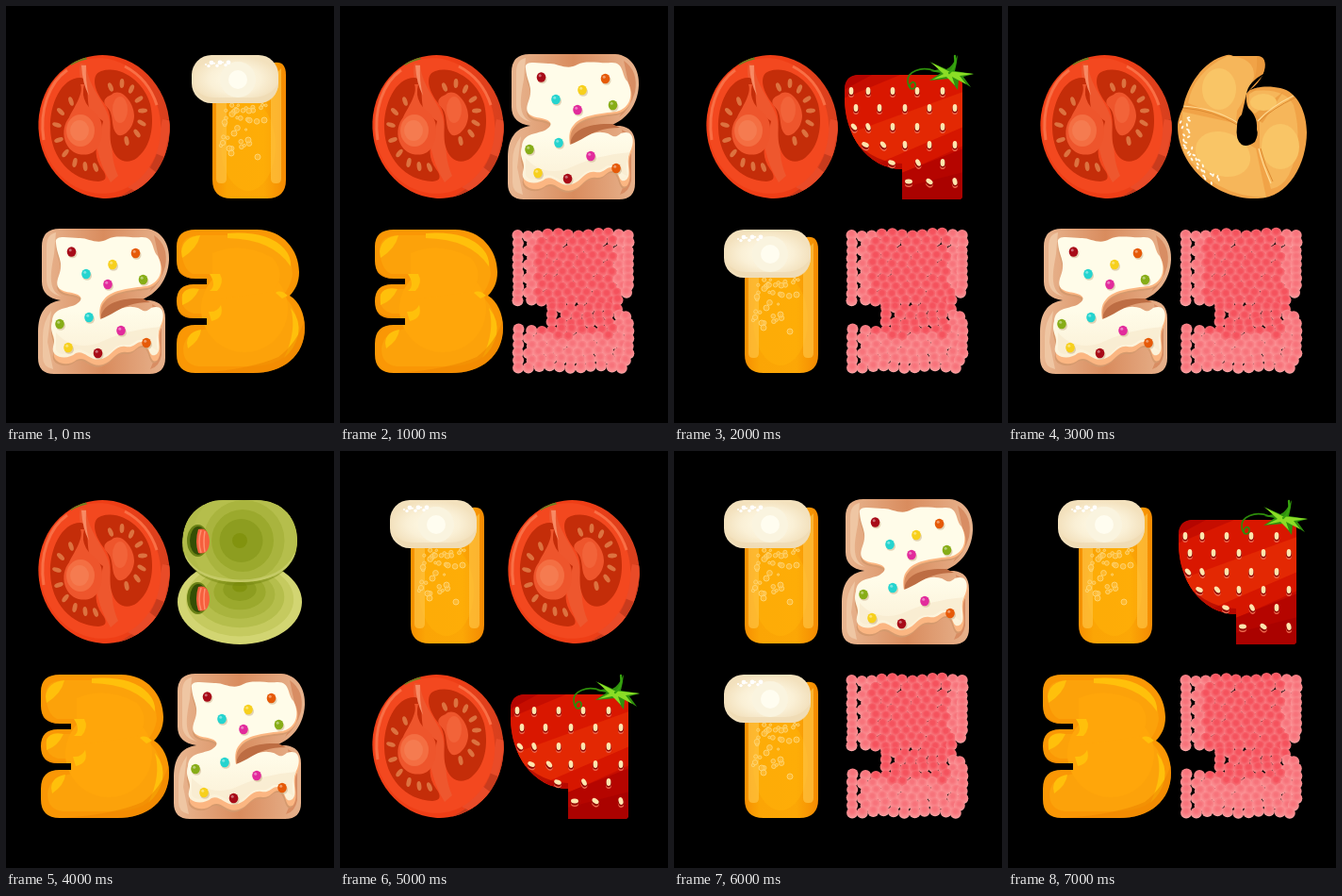
An HTML page for the animation above (8000 ms loop, 348 px wide and 442 px high).

```html
<!DOCTYPE html>
<html lang="en">
<head>
<meta charset="utf-8">
<title>Food clock</title>
<style>
html, body { margin: 0; width: 100%; height: 100%; overflow: hidden; background: #000; }
svg { display: block; width: 348px; height: 442px; }
.time { visibility: hidden; animation: show 8s step-end infinite; }
@keyframes show {
  0% { visibility: visible; }
  12.5%, 100% { visibility: hidden; }
}
</style>
</head>
<body>
<svg id="stage" viewBox="0 0 348 442">
<defs>
  <linearGradient id="rind"><stop offset=".6" stop-color="#ef3e16"/><stop offset="1" stop-color="#d5401f"/></linearGradient>
  <linearGradient id="ale"><stop offset="0" stop-color="#f68f02"/><stop offset=".2" stop-color="#fba505"/><stop offset=".7" stop-color="#fca706"/><stop offset="1" stop-color="#f48a02"/></linearGradient>
  <radialGradient id="head"><stop offset="0" stop-color="#fffbe9"/><stop offset=".6" stop-color="#faf0d6"/><stop offset="1" stop-color="#f3e1bd"/></radialGradient>
  <linearGradient id="crust"><stop offset="0" stop-color="#e9b792"/><stop offset=".5" stop-color="#d98c5e"/><stop offset="1" stop-color="#e8b48f"/></linearGradient>
  <linearGradient id="cream" x2="0" y2="1"><stop offset=".6" stop-color="#fffce9"/><stop offset="1" stop-color="#fbf0d6"/></linearGradient>
  <radialGradient id="ball" cx=".5" cy=".35" r=".7"><stop offset=".25" stop-color="#f5525d"/><stop offset=".75" stop-color="#f87b81"/><stop offset="1" stop-color="#fdacab"/></radialGradient>
  <radialGradient id="pale" cx=".5" cy=".35" r=".7"><stop offset=".2" stop-color="#f7737b"/><stop offset=".75" stop-color="#fb9295"/><stop offset="1" stop-color="#fec0bd"/></radialGradient>

  <clipPath id="c0"><ellipse cx="104" cy="128" rx="69.5" ry="76" transform="rotate(-8 104 128)"/></clipPath>
  <clipPath id="c3"><path id="p3" d="M57 52H122C150 52 167 74 167 97C167 108 163 116 157 122C167 128 173 141 173 156C173 186 150 204 118 204H57Q37 204 37 184V173Q37 153 57 153H69V146H55Q37 146 37 128Q37 110 55 110H69V104H57Q37 104 37 85V70Q37 52 57 52Z"/></clipPath>
  <clipPath id="c4"><path id="p4" d="M53 73H150Q162 73 162 85V201Q162 205 158 205H98V173C60 172 37 136 37 98V89Q37 73 53 73Z"/></clipPath>
  <clipPath id="c6"><path id="p6" d="M88 52Q91 51 95 53H121Q131 54 128 68C125 79 117 86 110 91C120 84 135 85 145 87C164 91 173 114 173 134C173 166 154 204 121 204C76 206 36 169 36 128C36 120 39 114 42 107C46 86 62 58 88 52Z"/></clipPath>
  <clipPath id="c8"><ellipse cx="104" cy="160" rx="66" ry="45"/></clipPath>
  <clipPath id="c8t"><path id="p8" d="M87 52H121C151 52 165 73 165 95C165 121 145 139 104 139C63 139 43 121 43 97C43 71 60 52 87 52Z"/></clipPath>

  <g id="d0">
    <g clip-path="url(#c0)">
      <path fill="url(#rind)" d="M30 48H178V208H30Z"/>
      <path fill="#c83b1d" d="M175 118V208H100C143 201 164 164 168 122Z"/>
      <path fill="#e94b28" d="M166 120L176 122L168 160L158 156ZM151 170L160 177L139 197L129 192Z"/>
      <path fill="#70801f" d="M66 59L83 50L86 57Q76 60 70 64Z"/>
      <ellipse cx="100" cy="127" rx="64" ry="72" fill="#f3481f" transform="rotate(-8 100 127)"/>
    </g>
    <path fill="none" stroke="#f96f45" stroke-width="3" d="M40 142C35 110 46 81 65 68M126 64Q151 77 160 105"/>
    <path fill="#ee572e" d="M79 61C75 78 86 91 86 108C96 124 91 155 111 187L119 180C107 152 117 132 105 108C94 88 87 80 85 62Z"/>
    <path fill="#c42d09" d="M80 76C59 75 46 104 47 130C48 161 69 185 98 186Q111 185 102 173C94 162 94 149 99 141L103 122L90 113C84 101 90 79 80 76Z"/>
    <path fill="#c42d09" d="M101 69C89 73 94 91 105 104C115 119 108 132 112 149C116 164 128 169 139 161C154 149 158 126 153 104C147 82 123 62 101 69Z"/>
    <path fill="#ee552c" d="M79 83C83 93 71 109 67 118C56 132 62 153 77 157C92 160 101 152 102 132C103 115 91 113 85 103Q80 94 83 83Z"/>
    <path fill="#ee552c" d="M112 94C122 85 136 103 136 116C136 131 122 142 117 135C111 128 115 114 107 107C101 101 106 96 112 94Z"/>
    <ellipse cx="79" cy="132" rx="15" ry="17" fill="#f46e42"/>
    <ellipse cx="78" cy="132" rx="10" ry="11" fill="#f57b50"/>
    <ellipse cx="121" cy="110" rx="8" ry="14" fill="#f26339"/>
    <path fill="#f78a64" d="M80 63Q81 82 88 95Q84 78 85 63Z"/>
    <g id="pips" fill="#dc7240"></g>
  </g>

  <g id="d1">
    <path fill="url(#ale)" d="M75 80L140 60Q153 58 153 73V184Q153 204 133 204H95Q75 204 75 184Z"/>
    <ellipse cx="113" cy="148" rx="29" ry="48" fill="#ffb30b" opacity=".45"/>
    <g fill="#ffc342" opacity=".7">
      <path d="M79 100H90V183Q90 188 85 188H84Q79 188 79 183ZM137 78L148 66V183Q148 188 143 188H142Q137 188 137 183Z"/>
    </g>
    <g id="fizz" stroke="#fed36e" fill="#fdbd3d" fill-opacity=".7"></g>
    <rect x="53" y="52" width="92" height="51" rx="21" fill="url(#head)"/>
    <path fill="#eed9b1" opacity=".6" d="M57 88Q63 103 81 103H125Q143 102 145 82Q137 96 118 97H77Q64 97 57 88Z"/>
    <circle cx="102" cy="78" r="19" fill="#faf4df"/>
    <circle cx="102" cy="78" r="10" fill="#fffdf0"/>
    <g id="froth" fill="#fff"></g>
  </g>

  <g id="d2">
    <path fill="url(#crust)" d="M57 51H148C166 52 174 69 173 84C172 105 160 121 142 127H153Q169 129 169 146V188Q169 205 152 205H51Q34 205 34 188V160C34 141 42 129 58 127Q38 124 38 107V70Q38 51 57 51Z"/>
    <path fill="#efc6a3" d="M53 55Q43 57 43 70V105Q43 119 59 123C43 116 48 95 51 78ZM48 138Q39 150 39 165V187Q39 198 50 200L44 171Z"/>
    <path fill="#d88d63" d="M157 58Q173 69 169 91Q164 109 152 118L165 96ZM155 131Q166 136 165 150V185Q163 197 153 200L162 178Z"/>
    <path fill="#bd6d43" d="M100 148C101 130 121 124 145 125L153 129Q128 129 113 142Z"/>
    <path id="icing" transform="translate(0 4)" fill="#d59a6e" d="M53 66C51 57 67 61 77 61C87 60 96 69 108 62C117 57 132 61 143 60C158 59 154 73 161 80C169 96 162 109 149 112C133 114 113 115 104 126C98 132 99 142 100 147C113 143 122 132 134 134C145 134 145 143 154 135C169 130 169 146 163 156C159 167 166 178 160 188C151 195 153 174 145 173C138 172 136 181 127 180C115 178 113 190 102 193C89 197 84 183 74 188C65 196 47 192 50 180C54 166 45 164 49 149C50 135 63 136 73 132C84 126 80 121 70 119C57 117 51 114 56 101C62 86 54 81 53 66Z"/>
    <use href="#icing" x="1" y="-2" style="filter:brightness(1.18)"/>
    <path fill="url(#cream)" d="M53 66C51 57 67 61 77 61C87 60 96 69 108 62C117 57 132 61 143 60C158 59 154 73 161 80C169 96 162 109 149 112C133 114 113 115 104 126C98 132 99 142 100 147C113 143 122 132 134 134C145 134 145 143 154 135C169 130 169 146 163 156C159 167 166 178 160 184C151 190 153 174 145 171C138 170 136 178 127 176C115 174 113 186 102 189C89 193 84 179 74 183C65 191 47 188 50 176C54 164 45 162 49 149C50 135 63 136 73 132C84 126 80 121 70 119C57 117 51 114 56 101C62 86 54 81 53 66Z"/>
    <path fill="#f9ebcf" d="M53 161Q69 180 96 173Q130 157 164 155Q157 167 161 180C154 179 153 170 144 169C136 168 135 176 126 174C114 173 113 183 102 186C89 189 84 176 73 180C62 186 52 185 53 176Z" opacity=".75"/>
    <g id="candy"></g>
  </g>

  <g id="d3">
    <use href="#p3" fill="#fa9705"/>
    <g clip-path="url(#c3)">
      <path fill="#fca20a" d="M42 72Q43 57 65 58H120Q158 62 160 99Q158 114 149 122Q164 132 166 157Q162 196 117 197H60Q44 195 44 178Q46 158 75 157V141H55Q42 137 42 124Q44 114 57 115H77V99H54Q43 94 42 72Z"/>
      <circle cx="109" cy="136" r="46" fill="#ffa60a"/>
      <path fill="#ffa60a" d="M75 77Q106 64 139 82Q154 100 139 118L75 127Z"/>
      <g fill="#ffc00b">
        <path d="M42 75Q44 60 62 58Q59 72 43 82ZM91 56Q133 53 151 72Q159 81 158 91Q139 62 91 61ZM43 121Q47 112 61 115Q55 128 43 132ZM48 172Q49 160 63 158Q62 169 49 178ZM158 135Q169 148 166 164Q162 179 151 188Q165 159 158 135Z"/>
        <path d="M72 99H83Q88 108 80 117H72Q80 111 72 99ZM71 139Q80 140 84 132Q88 146 74 149ZM142 119Q147 115 155 122L149 125Z"/>
      </g>
      <path fill="#ef8500" d="M60 204Q116 200 145 187Q165 172 173 147V205H60ZM37 91Q45 106 69 104V107H37ZM37 136Q46 147 69 146V149H37Z" opacity=".6"/>
    </g>
  </g>

  <g id="d4">
    <use href="#p4" fill="#c60d00"/>
    <g clip-path="url(#c4)">
      <path fill="#d91700" d="M36 98L96 73H163V111L39 154Z"/>
      <path fill="#e32803" d="M36 137L163 91V134L72 173Z"/>
      <path fill="#d61600" d="M70 168L163 128V148L90 181Z"/>
      <path fill="#b50500" d="M97 177L163 151V206H97ZM36 72H68L36 89Z"/>
      <path fill="#a40000" d="M97 193L163 176V206H97ZM37 130Q62 166 98 167V175H37Z" opacity=".6"/>
    </g>
    <g id="seeds"></g>
    <path fill="none" stroke="#2d8d0b" stroke-width="1.7" d="M133 69C118 63 103 70 104 80C105 91 113 89 112 83C111 78 104 82 107 88"/>
    <path fill="#2f910d" d="M127 59L145 67Q151 65 157 52Q156 62 154 69L174 72L163 75L171 86L158 78L157 89L148 77L127 79L139 71L128 69L138 67Z"/>
    <path fill="#8bdd26" d="M129 60L147 69L174 72L159 74L166 83L151 75L154 84L145 75L130 78L142 72Z"/>
    <path fill="none" stroke="#36a10f" stroke-width="2.3" stroke-linecap="round" d="M148 71Q156 65 154 53"/>
  </g>

  <g id="d5"></g>

  <g id="d6">
    <use href="#p6" fill="#f1a347"/>
    <g clip-path="url(#c6)">
      <path fill="#f6b65a" d="M89 53Q118 54 117 75Q110 95 99 111L98 122L47 103Q53 70 89 53ZM41 112L101 125Q102 143 119 151L130 203Q72 202 42 153ZM112 91Q148 85 159 105Q170 145 154 179Q147 192 135 194L123 150V118L111 108Z"/>
      <path fill="#e8953a" d="M129 52L132 75Q120 91 108 95Q122 77 120 52ZM114 117L148 91L126 124Z" opacity=".65"/>
      <g fill="#f9c566">
        <ellipse cx="80" cy="88" rx="18" ry="22"/>
        <ellipse cx="84" cy="157" rx="30" ry="23" transform="rotate(22 84 157)"/>
        <ellipse cx="145" cy="149" rx="20" ry="24"/>
        <ellipse cx="127" cy="102" rx="14" ry="9"/>
      </g>
      <path fill="none" stroke="#ffdb94" stroke-width="1.2" d="M41 106Q75 108 100 124M121 122Q134 107 159 95M122 151Q126 168 135 188"/>
      <path fill="none" stroke="#dc8a31" d="M42 108Q75 111 99 126M123 122Q136 109 161 97M124 151Q128 168 137 186"/>
    </g>
    <path d="M129 71Q111 80 109 93Q108 102 111 108C116 113 121 119 120 131Q122 136 118 144Q110 150 104 147Q97 142 99 127Q99 120 104 115Q107 103 109 93Q116 84 129 71Z"/>
    <g id="salt" fill="#fffbe9"></g>
  </g>

  <g id="d8">
    <g id="low" clip-path="url(#c8)"></g>
    <path d="M43 105Q55 142 105 143Q153 140 164 107L165 92L104 130L43 92Z" fill="#72830e" opacity=".45"/>
    <g id="high" clip-path="url(#c8t)"></g>
    <g id="pit">
      <ellipse cx="59.500" cy="95" rx="11.500" ry="17" fill="#698015"/>
      <ellipse cx="60" cy="95" rx="9" ry="15" fill="#344f05"/>
      <path fill="#f65f3d" d="M60 83Q71 80 72 96Q71 111 60 108Q56 96 60 83Z"/>
      <path fill="none" stroke="#ff9170" stroke-width="1.500" d="M63 84Q59 96 63 108M67 85Q65 96 67 107"/>
    </g>
    <use href="#pit" y="61"/>
  </g>
</defs>
</svg>
<script>
const $ = id => document.getElementById(id);
const fill = (id, items, draw) => { $(id).innerHTML += items.map(draw).join(''); };
const times = (n, f) => Array.from({ length: n }, (_, i) => f(i));
const oval = (x, y, rx, ry, turn, more = '') =>
  `<ellipse cx="${x}" cy="${y}" rx="${rx}" ry="${ry}" transform="rotate(${turn} ${x} ${y})" ${more}/>`;
const dot = (x, y, r, more = '') => `<circle cx="${x}" cy="${y}" r="${r}" ${more}/>`;

let seed = 7;
const rnd = () => (seed = seed * 16807 % 2147483647) / 2147483647;

// Tomato pips, each pointing at the middle of its chamber
const pip = (cx, cy) => ([x, y]) =>
  oval(x, y, 2.4, 5, Math.atan2(cy - y, cx - x) * 180 / Math.PI + 90);
fill('pips', [[69, 101], [58, 112], [54, 126], [56, 142], [63, 156], [73, 166], [84, 170], [95, 171]], pip(80, 134));
fill('pips', [[111, 86], [123, 82], [133, 88], [141, 99], [145, 111], [144, 124], [139, 135], [128, 143]], pip(122, 112));

// Beer bubbles, denser near the foam
fill('fizz', times(34, i => i), i => {
  const depth = rnd() ** 2;
  return dot(82 + rnd() * (50 - depth * 18), 105 + depth * 52, 1 + rnd() * 2);
});
fill('fizz', [[93, 151], [95, 156], [113, 142], [98, 135], [130, 121], [123, 160]], ([x, y]) => dot(x, y, 3));
fill('froth', times(9, i => i), i => dot(68 + i * 3, 62 + 2 * Math.sin(i * 2) - i * .2, 1 + i % 3 * .7));

const sweets = [
  [69.500, 75.500, '#a80b18'], [137.500, 77, '#e65a08'], [113, 89, '#f7d01d'], [85, 99, '#25d4cf'],
  [108, 110, '#e22b9c'], [145.500, 105, '#87ad17'], [57, 152, '#87ad17'], [88, 145, '#25d4cf'],
  [122, 159, '#e22b9c'], [149, 172, '#e65a08'], [66, 177, '#f7d01d'], [97.500, 183, '#a80b18']
];
fill('candy', sweets, ([x, y, c]) =>
  oval(x + 1, y + 2, 5, 4.800, 0, 'fill="#cbb18b" opacity=".55"') +
  oval(x, y, 4.800, 5.200, 0, `fill="${c}"`) + dot(x - 1.300, y - 1.800, 1.500, 'fill="#fff" opacity=".4"'));

const rows = [
  [90, 44, 62, 88, 114, 141], [108, 49, 74, 101, 127, 154], [128, 47, 62, 88, 114, 141],
  [147, 59, 78, 101, 127, 154], [166, 87, 115, 141], [186, 105, 127, 154]
];
fill('seeds', rows.flatMap(([y, ...xs]) => xs.map(x => [x, y])), ([x, y]) => {
  const turn = -Math.max(0, y - 105 - (x - 40) * .65) * 2.200;
  return oval(x, y + 3, 3, 4, turn, 'fill="#ef6b50"') + oval(x, y + 1.500, 3, 4, turn, 'fill="#8f0500"') +
    oval(x, y, 2.400, 4, turn, 'fill="#ffe5ad"');
});

// Raspberry beads: rows packed between the left and right edges
const left = y => y < 130 ? 45 : y < 157 ? 81 : 45;
const right = y => 162 - 14 * Math.exp(-(((y - 132) / 9) ** 2)) - Math.max(0, y - 184) * .5;
const beads = times(19, r => {
  const y = 58 + r * 7.750, l = left(y), w = right(y) - l, n = Math.round(w / 10.600);
  return times(n + 1, i => [
    l + w * i / n + (r % 2 && i && i < n ? 4 : 0) + rnd() - .5,
    y + Math.sin(i * 1.300 + r * .4) * 1.300 - (r < 2 ? i * .13 : 0)
  ]);
}).flat();
fill('d5', beads, ([x, y]) =>
  dot(x.toFixed(1), y.toFixed(1), 6, `fill="url(#${y > 166 || x < 66 || x > 151 ? 'pale' : 'ball'})"`));

fill('salt', times(32, i => i / 31), t => {
  const a = 3.300 - t * 1.300, r = 56 + rnd() * 10;
  return oval(104 + r * Math.cos(a), 128 + r * 1.050 * Math.sin(a), 1, 1.900, rnd() * 180);
});

// Olive rings, light rim to dark middle
const shades = ['#d2d572', '#c5ca5f', '#b5be4c', '#a9b43e', '#9ba92d', '#8d9d20', '#82930f'];
const ring = (cy, rx, ry, drift) => (c, i) => {
  const k = 1 - i / 6.800;
  return oval(104, cy - drift * (1 - k), rx * k, ry * k, 0, `fill="${c}"`);
};
fill('low', shades, ring(160, 67, 46, 18));
fill('high', ['#b1bb49'], c => `<use href="#p8" fill="${c}"/>`);
fill('high', shades.slice(2), (c, i) => dot(104 + (4 - i) * 1.500, 95, [57, 43, 33, 23, 8][i], `fill="${c}"`));
fill('high', ['#d0d478'], c => `<path d="M45 111Q57 137 104 138Q151 137 163 109" fill="none" stroke="${c}" stroke-width="3" opacity=".6"/>`);

const clock = ['0123', '0235', '0415', '0625', '0832', '1004', '1215', '1435'];
fill('stage', clock, (digits, i) =>
  `<g class="time" style="animation-delay:${i ? i - 8 : 0}s">` +
  [...digits].map((d, n) => `<use href="#d${d}" x="${n % 2 * 144}" y="${n > 1 ? 185 : 0}"/>`).join('') + '</g>');
</script>
</body>
</html>
```
